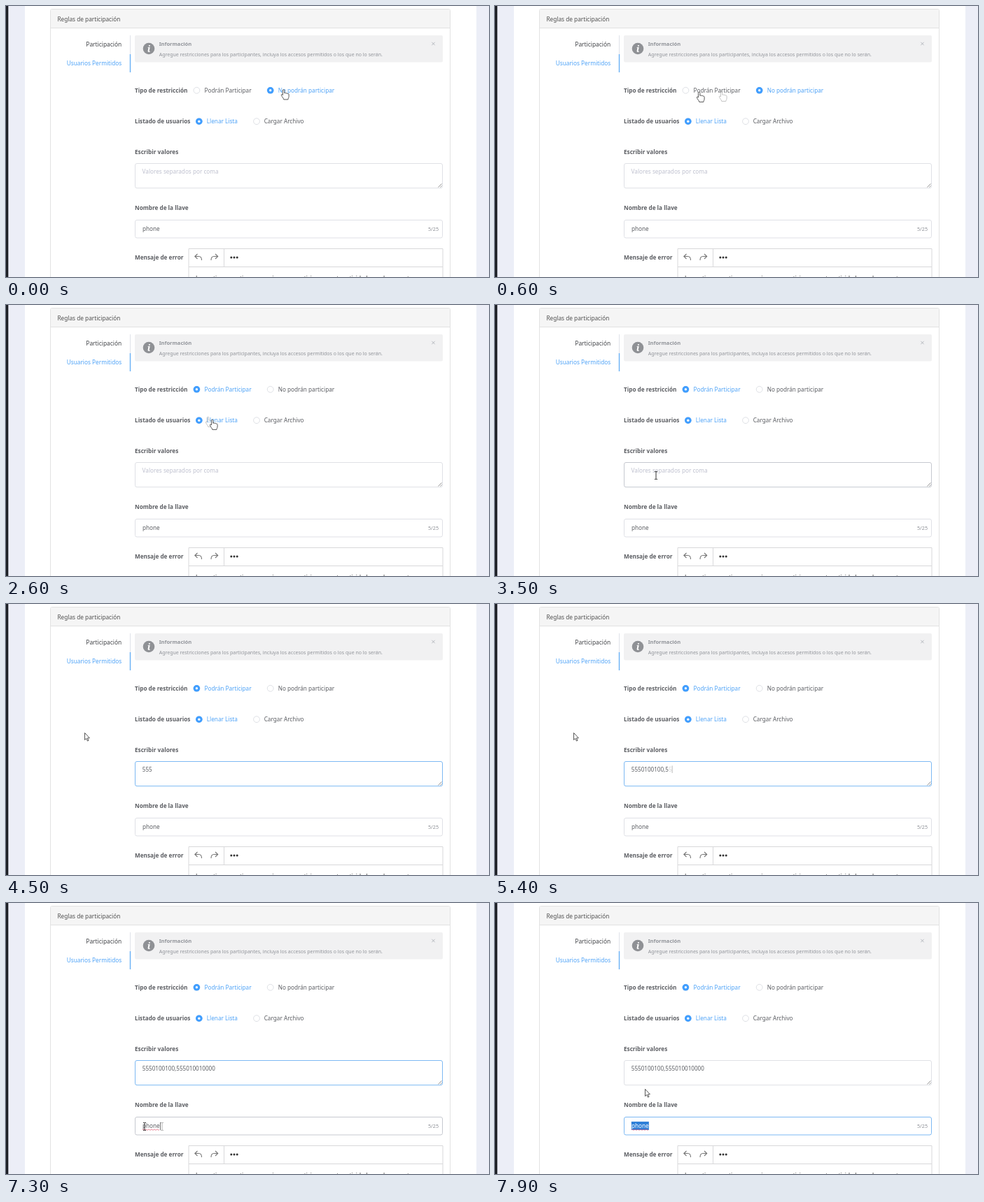
Recreate the animation shown at these times as an HTML page. Size 690 by 388 pixels, loop 8000 ms.

```html
<!DOCTYPE html>
<html lang="es">
<head>
<meta charset="utf-8">
<title>Reglas de participación</title>
<style>
  html, body { margin: 0; width: 100%; height: 100%; overflow: hidden; background: #eceef7; }
  svg { display: block; }
  text { font: 8.2px "Noto Sans", sans-serif; fill: #5c5e63; white-space: pre; }
  .label { font-weight: 700; fill: #5c5e63; }
  .blue { fill: #4fa3f7; }
  .note { fill: #909399; }
  .box { fill: #fff; stroke: #dfe1e6; }
  .line { fill: none; stroke: #d8d8da; }
  .icon { fill: none; stroke: #777; stroke-width: 1.1; }
  .cursor { fill: #fff; stroke: #444; stroke-width: .9; stroke-linejoin: round; }
</style>
</head>
<body>
<svg width="690" height="388" viewBox="0 0 690 388">
  <defs>
    <path id="hand" class="cursor" d="M-3.6 1V-5.6a1.2 1.2 0 0 1 2.4 0V-1.6c.3-.7 2-.7 2.2.3c.5-.7 2-.5 2.2.5c.6-.5 1.9-.1 1.9 1V3c0 2-1.2 2.6-1.2 4.4H-2.2C-2.4 5.5-4.8 3.6-5.6 1.2C-6 0-4.6-.6-3.6 1Z"/>
    <path id="arrow" class="cursor" d="M.5 .5V10.6L2.8 8.5L4.4 12.1L6 11.4L4.4 7.9H7.4Z"/>
    <path id="beam" d="M-2-5.5H-.6L0-5L.6-5.5H2M0-5V5M-2 5.5H-.6L0 5L.6 5.5H2" fill="none" stroke="#333"/>
  </defs>

  <rect width="3.3" height="388" fill="#1c1f25"/>
  <rect x="27" width="645" height="388" fill="#fff"/>
  <rect x="63.5" y="4.5" width="571" height="400" rx="2" class="line" style="stroke:#e2e2e2"/>
  <path d="M64 5H634V31.5H64Z" fill="#f5f5f5"/>
  <path d="M64 31.5H634" class="line" style="stroke:#e2e2e2"/>
  <text x="73.4" y="21.6" style="fill:#505050;font-size:8.28px">Reglas de participación</text>

  <text x="165.2" y="58.4" text-anchor="end" style="fill:#424448;font-size:8.4px">Participación</text>
  <text x="165.2" y="85" text-anchor="end" class="blue" style="font-size:8.28px">Usuarios Permitidos</text>
  <path d="M177.5 42V69" class="line" style="stroke:#dfe2e8"/>
  <path d="M177.5 69V95" class="line" style="stroke:#68b0f5;stroke-width:1.4"/>

  <rect x="184" y="42" width="440" height="38.5" rx="2" fill="#f1f1f2"/>
  <circle cx="204" cy="61" r="8.3" fill="#8f9195"/>
  <text x="204" y="65.6" text-anchor="middle" style="font:italic bold 13px 'Noto Serif',serif;fill:#fff">i</text>
  <text x="218.7" y="57.4" class="note" style="font-size:7.5px;font-weight:700">Información</text>
  <text x="218.7" y="72.4" class="note" style="font-size:7px">Agregue restricciones para los participantes, incluya los accesos permitidos o los que no lo serán.</text>
  <path d="M608.3 51.8l4.4 4.4m0-4.4l-4.4 4.4" class="icon" style="stroke:#a8abb2;stroke-width:.8"/>

  <text x="184" y="123.5" class="label">Tipo de restricción</text>
  <text x="184" y="168" class="label">Listado de usuarios</text>
  <text x="184" y="212.4" class="label">Escribir valores</text>
  <text x="184" y="292.4" class="label">Nombre de la llave</text>
  <text x="184" y="363.2" class="label">Mensaje de error</text>
  <g id="radios"></g>

  <rect id="area" x="184.5" y="225.5" width="439" height="35.2" rx="2.5" class="box"/>
  <path d="M617.5 259.5l5-5m-2 5l2-2" class="icon" style="stroke-width:.8"/>
  <text id="hint" x="194.6" y="239.8" style="fill:#bfc1cf">Valores separados por coma</text>
  <text id="typed" x="194.8" y="239.8" style="font-size:8.1px"><tspan id="done"></tspan><tspan id="next"></tspan></text>
  <path id="caret" d="M0 231.5V242" stroke="#555" stroke-width=".8" opacity=".5"/>

  <rect id="key" x="184.5" y="306.5" width="439" height="25.5" rx="2.5" class="box"/>
  <rect id="mark" x="194.8" y="313" height="12" fill="#2f80d8"/>
  <text id="word" x="195" y="322.4">phone</text>
  <path id="wordCaret" d="M220.5 314V325" stroke="#555" stroke-width=".8"/>
  <path id="wave" d="M195 324.6q1-1.4 2 0t2 0 2 0 2 0 2 0 2 0 2 0 2 0 2 0 2 0 2 0 2 0" fill="none" stroke="#e0506a" stroke-width=".7"/>
  <text x="618" y="322" text-anchor="end" class="note" style="font-size:7.2px">5/25</text>

  <path d="M261 388V347.5H624V388M261 373.5H624M311.5 347V373" class="line"/>
  <path id="undo" class="icon" d="M273.5 355l-3.7 3.5 3.7 3.5M270 358.5h5.5q4 0 4 5.5"/>
  <use href="#undo" transform="matrix(-1 0 0 1 572.5 0)"/>
  <g fill="#333"><circle cx="321.8" cy="360" r="1.5"/><circle cx="326" cy="360" r="1.5"/><circle cx="330.2" cy="360" r="1.5"/></g>
  <text x="271" y="393.2" style="fill:#333">Lo sentimos, no tienes permiso para participar en esta actividad por el momento.</text>

  <use id="ghost" opacity=".35"/>
  <use id="pointer"/>
</svg>
<script>
const LOOP = 8000, STEP = 100;
const VALUES = "5550100100,555010010000";
const $ = id => document.getElementById(id);
const BLUE = "#409eff", FOCUS = "#7db9f3", HOVER = "#c6c9d0", IDLE = "#dfe1e6";

// time, x, y, shape used until the next point
const path = [
  [300, 399, 126.5, "hand"], [400, 381, 127, "hand"], [500, 326, 129, "hand"], [600, 294, 130, "hand"],
  [1700, 294, 130, "hand"], [1800, 285, 133, "hand"], [1900, 278, 137, "arrow"], [2200, 268, 150, "arrow"],
  [2400, 285, 163, "hand"], [2600, 297, 171, "hand"], [2900, 299, 177, "hand"], [3100, 299, 177, "hand"],
  [3200, 283, 193, "arrow"], [3300, 244, 230, "beam"], [3400, 230, 244, "beam"], [3800, 230, 244, "beam"],
  [3900, 214, 232, "arrow"], [4300, 112, 184, "arrow"], [6700, 112, 184, "arrow"],
  [7100, 215, 312, "beam"], [7200, 223, 320, "beam"], [7300, 198, 320, "beam"], [7700, 196, 320, "beam"],
  [7800, 206, 291, "arrow"], [7900, 214, 266, "arrow"]
];

function cursorAt(t) {
  const i = Math.max(0, path.findLastIndex(p => p[0] <= t));
  const a = path[i], b = path[i + 1] || a;
  const k = b === a ? 0 : Math.max(0, (t - a[0]) / (b[0] - a[0]));
  return { x: a[1] + (b[1] - a[1]) * k, y: a[2] + (b[2] - a[2]) * k, shape: a[3] };
}

function place(use, c) {
  use.setAttribute("href", "#" + c.shape);
  use.setAttribute("transform", `translate(${c.x} ${c.y})`);
}

function addRadio(cx, cy, textX, label) {
  const g = document.createElementNS("http://www.w3.org/2000/svg", "g");
  const text = cls => `<text class="${cls}" x="${textX}" y="${cy + 2.7}">${label}</text>`;
  g.innerHTML = `<circle cx="${cx}" cy="${cy}" r="4.4" class="box"/><g>${text("")}</g>
    <g><circle cx="${cx}" cy="${cy}" r="4.8" fill="${BLUE}"/><circle cx="${cx}" cy="${cy}" r="1.7" fill="#fff"/>${text("blue")}</g>`;
  $("radios").append(g);
  const [, off, on] = g.children;
  return level => {
    off.style.opacity = 1 - level;
    on.style.opacity = level;
  };
}

const allow = addRadio(272.4, 120.8, 283.6, "Podrán Participar");
const deny = addRadio(377.7, 120.8, 388.7, "No podrán participar");
addRadio(275.8, 165.2, 286.8, "Llenar Lista")(1);
addRadio(358, 165.2, 368.7, "Cargar Archivo")(0);

const show = (id, on) => $(id).style.display = on ? "" : "none";

function draw(t) {
  const switched = t < 900 ? 0 : t < 1000 ? .5 : 1;
  allow(switched);
  deny(1 - switched);

  const count = Math.min(VALUES.length, Math.max(0, 3 + (t - 4500) / 100 * 1.04));
  const whole = Math.floor(count);
  $("done").textContent = VALUES.slice(0, whole);
  $("next").textContent = count > whole ? VALUES[whole] : "";
  $("next").style.fillOpacity = (count - whole) * .7;
  show("hint", count === 0);
  show("caret", t > 4500 && t < 6500);
  $("caret").setAttribute("transform", `translate(${195.4 + $("typed").getComputedTextLength()} 0)`);

  const selected = t >= 7400;
  $("area").style.stroke = t < 3500 || selected ? IDLE : t < 3800 ? HOVER : FOCUS;
  $("key").style.stroke = t < 7100 ? IDLE : selected ? FOCUS : HOVER;
  show("mark", selected);
  show("wave", t >= 7300);
  show("wordCaret", t >= 7300 && !selected);
  $("mark").setAttribute("width", $("word").getComputedTextLength() + .3);
  $("word").style.fill = selected ? "#fff" : "";

  const now = cursorAt(t), before = cursorAt(t - STEP);
  place($("pointer"), now);
  place($("ghost"), before);
  show("ghost", t < 7900 && Math.hypot(now.x - before.x, now.y - before.y) > 2);
}

function tick() {
  draw(Math.floor(performance.now() % LOOP / STEP) * STEP);
  requestAnimationFrame(tick);
}
tick();
</script>
</body>
</html>
```
